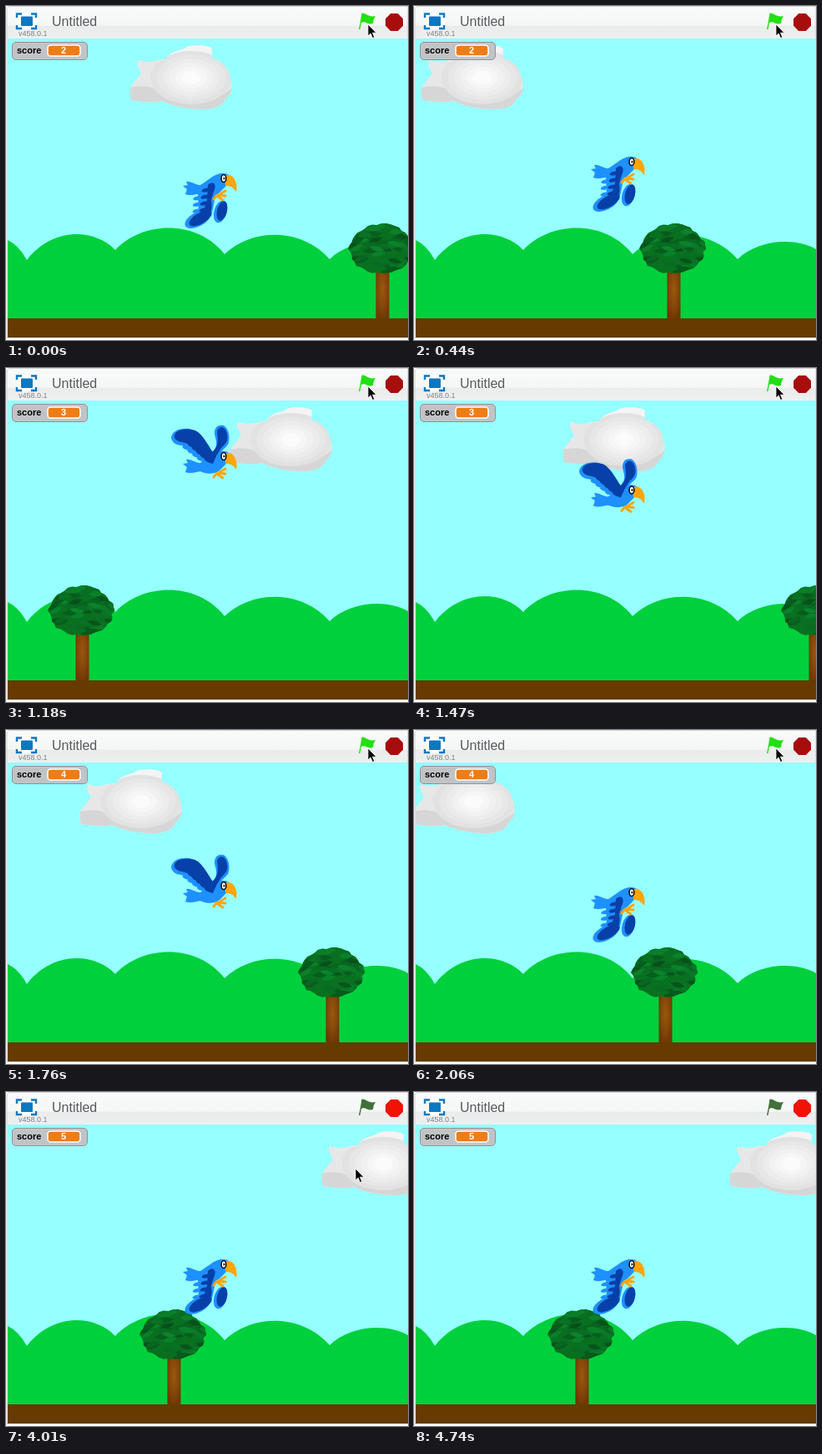
An HTML page for the animation above (5190 ms loop, 482x401 px).

```html
<!DOCTYPE html>
<html lang="en">
<head>
<meta charset="utf-8">
<title>Untitled</title>
<style>
  html, body { margin: 0; width: 100%; height: 100%; overflow: hidden; background: #fff; }
  svg { display: block; width: 482px; height: 401px; }
  text { font-family: "Liberation Sans", Arial, sans-serif; }
  .light { fill: #1e90ff; }
  .dark { fill: #0640a8; }
</style>
</head>
<body>
<svg viewBox="0 0 482 401">
  <defs>
    <linearGradient id="bar" x2="0" y2="39" gradientUnits="userSpaceOnUse">
      <stop offset="0" stop-color="#f9fafa"/>
      <stop offset=".6" stop-color="#f5f6f6"/>
      <stop offset=".61" stop-color="#eaebeb"/>
      <stop offset="1" stop-color="#eeefef"/>
    </linearGradient>
    <radialGradient id="bark" cy=".45" r=".6">
      <stop offset="0" stop-color="#9a570d"/>
      <stop offset=".5" stop-color="#87490a"/>
      <stop offset="1" stop-color="#6f3606"/>
    </radialGradient>
    <path id="puff" d="M0 98C5 90 12 84 13 80C9 75 6 68 10 65C22 70 34 64 44 64C46 54 60 55 68 49C76 46 96 47 98 52L97 62C112 66 119 78 119 84C124 96 122 106 114 111C112 120 100 124 88 124C60 123 50 119 38 114C26 117 10 114 1 113Q-1 104 0 98Z"/>
    <path id="crown"/>
    <clipPath id="stage"><rect x="2" y="39" width="480" height="359"/></clipPath>
    <clipPath id="inCrown"><use href="#crown"/></clipPath>
    <clipPath id="inPuff"><use href="#puff"/></clipPath>
  </defs>

  <!-- title bar -->
  <path d="M1 399V5Q1 .5 6 .5H482V399Z" fill="url(#bar)" stroke="#d0d1d2"/>
  <rect y="399" width="482" height="2" fill="#fff"/>
  <rect x="13" y="9" width="24" height="19" fill="#fff"/>
  <path d="M13 14V9.500H19M30 9.500H36V14M36 23V27H30M19 27H13V23" fill="none" stroke="#0b78c2" stroke-width="2.400"/>
  <rect x="18" y="12.500" width="14" height="11.500" rx="1" fill="#0b78c2"/>
  <text x="55" y="24" font-size="16" fill="#565a5c">Untitled</text>
  <text x="15" y="36" font-size="9" fill="#808285">v458.0.1</text>
  <path id="flag" d="M426.500 8.500C432 8 434 14 443 12Q440 16 440 21C433 23 431 17 426 20L424.500 28H423L425 18Z"/>
  <path id="stop" d="M461.200 9H469.800L476 15.200V23.800L469.800 30H461.200L455 23.800V15.200Z"/>

  <!-- stage -->
  <g clip-path="url(#stage)">
    <rect x="2" y="39" width="480" height="340" fill="#96ffff"/>
    <path d="M2 281Q15 287 25 305C55 266 105 266 131 293C165 257 230 257 262 298C295 266 355 266 388 304C412 281 455 277 482 292V376H2Z" fill="#00d03b"/>
    <rect x="2" y="375" width="480" height="24" fill="#663a00"/>
    <g id="cloud">
      <use href="#puff" fill="#e7e7e7"/>
      <g clip-path="url(#inPuff)">
        <path d="M8 60L42 68L58 57L80 56L104 64L125 40H10Z" fill="#f4f4f4"/>
        <path d="M-2 98Q18 94 28 99Q42 112 62 115Q95 122 122 98V130H-2Z" fill="#d6d6d6"/>
        <g id="rings"></g>
      </g>
    </g>
    <g id="tree">
      <rect x="33.500" y="312" width="16" height="63" fill="url(#bark)"/>
      <use href="#crown" fill="#08701f"/>
      <g id="leaves" clip-path="url(#inCrown)"></g>
    </g>
    <g id="bird">
      <path class="light" d="M-25 8C-34 9 -39 2 -45 4L-43 8L-49 9L-44 13L-46 19C-38 22 -33 18 -25 18Z"/>
      <path class="light" d="M-30 9C-20 4 -14 -4 -4 -6C4 -7 9 -4 8 2C4 8 1 11 -4 16C-9 22 -22 22 -30 17Z"/>
      <g id="up">
        <path class="light" d="M-11 -27C-11 -37 -5 -38 0 -37C7 -33 8 -20 5 -14C1 -9 -4 -6 -9 0L-14 -4C-6 -12 -9 -18 -11 -27Z"/>
        <path class="dark" d="M-8 -30C-5 -38 2 -36 4 -27C6 -18 2 -15 -3 -10L-11 3L-15 -4C-5 -12 -7 -20 -8 -30Z"/>
        <path class="light" d="M-63 -22C-62 -32 -50 -34 -42 -33C-28 -31 -20 -18 -10 2L-14 10L-24 7C-34 0 -42 -8 -50 -13C-57 -13 -62 -17 -63 -22Z"/>
        <path class="dark" d="M-59 -25C-58 -33 -42 -34 -34 -31C-24 -26 -18 -10 -9 0L-13 9C-18 8 -22 2 -26 -4C-34 -10 -40 -15 -50 -17C-57 -18 -60 -22 -59 -25Z"/>
      </g>
      <g id="down">
        <ellipse class="light" rx="17" ry="8.500" transform="translate(-31 49) rotate(-28)"/>
        <path class="light" d="M-19 8L-31 15L-30 42L-15 46L-8 12Z"/>
        <ellipse class="dark" rx="15" ry="6.500" transform="translate(-28 48) rotate(-30)"/>
        <path class="dark" d="M-19 8C-14 2 -7 6 -12 16L-15 26Q-13 38 -18 46L-26 44L-20 26Z"/>
        <ellipse class="light" rx="7.500" ry="13.500" transform="translate(-4 40) rotate(16)"/>
        <ellipse class="dark" rx="6" ry="12" transform="translate(-2 39) rotate(14)"/>
      </g>
      <path d="M-10 22L2 15M-6 20L2 21M-8 21L-1 26M-9 21L-12 25" fill="none" stroke="#ffa50a" stroke-width="3" stroke-linecap="round"/>
      <path d="M2 -3C9 -8 18 3 15 16C12 12 10 9 4 9Q1 9 2 5Z" fill="#ffa50a"/>
      <ellipse rx="2.900" ry="4.500" fill="#fff" stroke="#000" stroke-width="1.500"/>
      <ellipse cx=".5" rx=".9" ry="1.600"/>
    </g>
  </g>

  <!-- score -->
  <rect x="7.500" y="43.500" width="90" height="21" rx="4.500" fill="#c1c4c7" stroke="#949191"/>
  <text x="13" y="57" font-size="11" font-weight="700">score</text>
  <rect x="50" y="47" width="39" height="13" rx="3.500" fill="#ee7d16" stroke="#fff" stroke-width="1.500"/>
  <text id="score" x="69" y="57" font-size="11" font-weight="700" fill="#fff" text-anchor="middle"></text>

  <path id="cursor" d="M1 1V15L4.200 12L6.500 17.500L8.800 16.500L6.500 11.200H11Z" stroke="#fff" stroke-width=".8"/>
</svg>
<script>
const $ = id => document.getElementById(id);
const LOOP = 5190;
const STEP = 147.2;
const LAST = 17;

// step, eye height
const flight = [[0, 207], [3, 187], [8, 106], [12, 187], [LAST, 207]];
// time, tip of the pointer
const pointer = [[0, 433, 21], [4010, 418, 91], [4160, 414, 272], [4300, 412, 332],
                 [4450, 433, 375], [4590, 435, 386], [4740, 435, 420]];

const wrap = (x, min) => ((x - min) % 480 + 480) % 480 + min;
const move = (id, x, y) => $(id).setAttribute("transform", `translate(${x} ${y})`);
const show = (id, on) => $(id).style.display = on ? "" : "none";

function along(keys, x) {
  const i = Math.max(1, keys.findIndex(k => k[0] >= x));
  const [x0, y0] = keys[i - 1], [x1, y1] = keys[i];
  return y0 + (y1 - y0) * (x - x0) / (x1 - x0);
}

function add(parent, name, attrs) {
  const el = document.createElementNS("http://www.w3.org/2000/svg", name);
  for (const k in attrs) el.setAttribute(k, attrs[k]);
  $(parent).append(el);
}

let seed = 7;
const rnd = () => (seed = seed * 16807 % 2147483647) / 2147483647;

function feathers(wing, color, count, [x0, y0], [x1, y1], turn) {
  for (let i = 0; i < count; i++) {
    const k = i / (count - 1);
    const x = x0 + (x1 - x0) * k, y = y0 + (y1 - y0) * k;
    add(wing, "ellipse", { class: color, rx: 5.5, ry: 2.3, transform: `translate(${x} ${y}) rotate(${turn})` });
  }
}
feathers("up", "light", 5, [-44, -10], [-21, 8], 15);
feathers("up", "dark", 5, [-38, -13], [-18, 5], 25);
feathers("down", "light", 4, [-31, 16], [-32, 39], -12);
feathers("down", "dark", 4, [-21, 14], [-24, 38], -12);

for (let i = 0; i < 6; i++) {
  const v = 226 + i * 5;
  add("rings", "ellipse", { cx: 73, cy: 86, rx: 49 - i * 7.5, ry: 32 - i * 4.800, fill: `rgb(${v},${v},${v})` });
}

// ragged oval crown
const rim = Array.from({ length: 44 }, (_, i) => {
  const a = i / 44 * Math.PI * 2, r = 1.01 - rnd() * .1;
  return `${40 + 40 * r * Math.cos(a)} ${291.500 + 31 * r * Math.sin(a)}`;
});
$("crown").setAttribute("d", `M${rim.join("L")}Z`);

for (let i = 0; i < 90; i++) {
  const x = rnd() * 80, y = 262 + rnd() * 60, turn = (x - 40) * .6 + rnd() * 30 - 15;
  add("leaves", "path", {
    d: "M-9 0Q-1 -6 9 0Q0 6 -9 0Z",
    fill: `hsl(136 85% ${17 + rnd() * 11}%)`,
    transform: `translate(${x} ${y}) rotate(${turn})`
  });
}

function draw(t) {
  const step = Math.min(LAST, Math.floor((t + 7) / STEP));
  const running = step < LAST;
  const far = Math.min(730, 10 * Math.ceil(step * 4.5));
  move("tree", wrap(410 - far, -30), 0);
  move("cloud", wrap(149 - far, -60), 0);

  move("bird", 261, along(flight, step));
  const up = step > 6 && step < 14;
  show("up", up);
  show("down", !up);

  $("score").textContent = 2 + Math.floor((step + .6) / 5.5);
  $("flag").setAttribute("fill", running ? "#22e012" : "#41703a");
  $("stop").setAttribute("fill", running ? "#a80d0d" : "#f01305");
  const [, x, y] = pointer.findLast(p => p[0] <= t);
  move("cursor", x, y);
}

const start = performance.now();
function tick(now) {
  draw(Math.max(0, now - start) % LOOP);
  requestAnimationFrame(tick);
}
draw(0);
requestAnimationFrame(tick);
</script>
</body>
</html>
```
